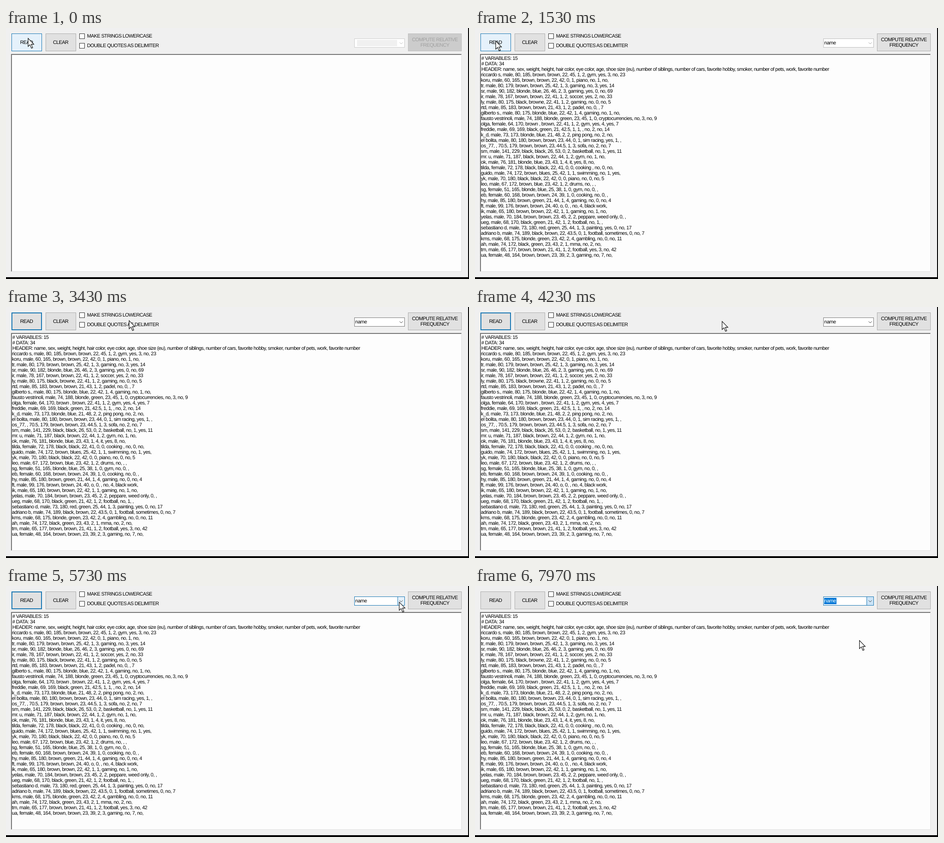
Animation, 1017 px wide and 551 px high, one loop 8000 ms. Source, as an HTML page:

```html
<!DOCTYPE html>
<html lang="en">
<head>
<meta charset="utf-8">
<title>CSV reader</title>
<style>
  html, body { margin: 0; width: 100%; height: 100%; overflow: hidden; }
  body {
    position: relative;
    background: #f0f0f0;
    color: #000;
    font: 11px/12px "Liberation Sans", Arial, sans-serif;
    letter-spacing: -.62px;
    text-rendering: geometricPrecision;
    cursor: default;
    --blue: #1a78b4;
  }
  body * { position: absolute; box-sizing: border-box; white-space: pre; }
  .edge { background: #000; }

  .btn {
    top: 12px; height: 39px;
    display: flex; align-items: center; justify-content: center;
    text-align: center;
    background: #e1e1e1;
    border: 1px solid #adadad;
  }
  .btn span { position: static; }
  #read { left: 12px; width: 67px; animation: read 8s step-end infinite; }
  #clear { left: 87px; width: 67px; }
  #read span, #clear span { margin-right: 1px; }
  #compute { left: 883px; width: 118px; animation: enable 8s step-end infinite; }

  .check { left: 161px; width: 12px; height: 12px; background: #fff; border: 1px solid #333; }
  .label { left: 178px; }

  #combo {
    left: 765px; top: 23px; width: 111px; height: 20px;
    background: #fff;
    border: 1px solid #7a7a7a;
    animation: combo 8s step-end infinite;
  }
  #blank { left: 5px; top: 2px; width: 88px; height: 14px; background: #f0f0f0; animation: before 8s step-end infinite; }
  #value { left: 1px; top: 2px; height: 14px; line-height: 14px; letter-spacing: -.49px; padding-right: 1px; animation: value 8s step-end infinite; }
  #drop { right: -1px; top: -1px; width: 16px; height: 20px; border: 1px solid transparent; animation: drop 8s step-end infinite; }
  #arrow { left: 3px; top: 7px; width: 8px; height: 5px; fill: none; stroke: #444; animation: arrow 8s step-end infinite; }

  #box {
    left: 11px; top: 57px; width: 990px; height: 478px;
    background: #fdfdfd;
    border: 1px solid #e3e3e3;
    border-top-color: #808080;
    border-left-color: #808080;
    box-shadow: inset 1px 1px #696969;
  }
  #data {
    left: 1px; top: 2.5px; margin: 0;
    font: inherit; line-height: 12.02px; letter-spacing: -.49px;
    animation: data 8s step-end infinite;
  }
  #data b { position: relative; left: 1px; font-weight: normal; letter-spacing: -.545px; }

  #mouse { left: -1px; top: 0; width: 16px; height: 26px; overflow: visible; animation: mouse 8s linear infinite; }
  #mouse path { fill: #fff; stroke: #000; stroke-width: 1.1; stroke-linejoin: miter; }

  @keyframes read {
    0%, 17.9% { background: #e5f1fb; border: 1px solid var(--blue); }
    16.25% { background: #cce4f7; border: 1px solid #005499; }
    35.9% { background: #e1e1e1; border: 2px solid var(--blue); }
    72.5%, 100% { background: #e1e1e1; border: 1px solid #adadad; }
  }
  @keyframes enable {
    0% { background: #ccc; border-color: #bfbfbf; color: #a0a0a0; }
    18.5%, 100% { background: #e1e1e1; border-color: #adadad; color: #000; }
  }
  @keyframes combo {
    0% { border-color: #ccc; }
    18.5% { border-color: #bdbdbd; }
    20.2% { border-color: #9a9a9a; }
    21.5% { border-color: #7a7a7a; }
    63% { border-color: #171717; }
    67.5%, 100% { border-color: var(--blue); }
  }
  @keyframes arrow {
    0% { stroke: #bfbfbf; }
    18.5% { stroke: #a8a8a8; }
    20.2% { stroke: #777; }
    21.5%, 100% { stroke: #444; }
  }
  @keyframes before { 0% { opacity: 1; } 18.5%, 100% { opacity: 0; } }
  @keyframes data { 0% { opacity: 0; } 18.5%, 100% { opacity: 1; } }
  @keyframes value {
    0% { opacity: 0; background: transparent; color: #000; }
    18.5% { opacity: 1; background: transparent; color: #000; }
    72.5%, 100% { opacity: 1; background: #0078d7; color: #fff; }
  }
  @keyframes drop {
    0% { background: transparent; border-color: transparent; }
    67.5% { background: #e5f1fb; border-color: var(--blue); }
    72.5%, 100% { background: #cce4f7; border-color: var(--blue); }
  }
  @keyframes mouse {
    0% { transform: translate(49px, 22px); }
    8% { transform: translate(48px, 25px); }
    15%, 19.125% { transform: translate(46px, 28px); }
    33.375% { transform: translate(52px, 28px); }
    35% { transform: translate(56px, 28px); }
    52.875% { transform: translate(543px, 31px); }
    60.875% { transform: translate(717px, 31px); }
    67.5% { transform: translate(862px, 34px); }
    73% { transform: translate(865px, 35px); }
    84.125% { transform: translate(857px, 42px); }
    87% { transform: translate(857px, 45px); }
    99.6%, 100% { transform: translate(845px, 119px); }
  }
</style>
</head>
<body>
<div class="btn" id="read"><span>READ</span></div>
<div class="btn" id="clear"><span>CLEAR</span></div>
<div class="check" style="top:12px"></div>
<div class="label" style="top:12px">MAKE STRINGS LOWERCASE</div>
<div class="check" style="top:33px"></div>
<div class="label" style="top:33px">DOUBLE QUOTES AS DELIMITER</div>

<div id="combo">
  <div id="blank"></div>
  <div id="value">name</div>
  <div id="drop"><svg id="arrow" viewBox="0 0 8 5"><path d="M.5 .5L4 4L7.5 .5"/></svg></div>
</div>
<div class="btn" id="compute"><span>COMPUTE RELATIVE
FREQUENCY</span></div>

<div id="box"><pre id="data"><b># VARIABLES: 15
# DATA: 34
HEADER: name, sex, weight, height, hair color, eye color, age, shoe size (eu), number of siblings, number of cars, favorite hobby, smoker, number of pets, work, favorite number</b>
riccardo s, male, 80, 185, brown, brown, 22, 45, 1, 2, gym, yes, 3, no, 23
koru, male, 60, 165, brown, brown, 22, 42, 0, 1, piano, no, 1, no,
tr, male, 80, 179, brown, brown, 25, 42, 1, 3, gaming, no, 3, yes, 14
sr, male, 90, 182, blonde, blue, 26, 46, 2, 3, gaming, yes, 0, no, 69
ir, male, 78, 167, brown, brown, 22, 41, 1, 2, soccer, yes, 2, no, 33
ly, male, 80, 175, black, browne, 22, 41, 1, 2, gaming, no, 0, no, 5
rtd, male, 85, 183, brown, brown, 21, 43, 1, 2, padel, no, 0, , 7
gilberto s., male, 80, 175, blonde, blue, 22, 42, 1, 4, gaming, no, 1, no,
fausto vestrinoli, male, 74, 188, blonde, green, 23, 45, 1, 0, cryptocurrencies, no, 3, no, 9
olga, female, 64, 170, brown , brown, 22, 41, 1, 2, gym, yes, 4, yes, 7
freddie, male, 69, 169, black, green, 21, 42.5, 1, 1, , no, 2, no, 14
k_d, male, 73, 173, blonde, blue, 21, 48, 2, 2, ping pong, no, 2, no,
el bolita, male, 80, 180, brown, brown, 23, 44, 0, 1, sim racing, yes, 1, ,
os_77, , 70.5, 179, brown, brown, 23, 44.5, 1, 3, sofa, no, 2, no, 7
sm, male, 141, 229, black, black, 26, 53, 0, 2, basketball, no, 1, yes, 11
mr. u, male, 71, 187, black, brown, 22, 44, 1, 2, gym, no, 1, no,
ok, male, 76, 181, blonde, blue, 23, 43, 1, 4, it, yes, 8, no,
tilda, female, 72, 178, black, black, 22, 41, 0, 0, cooking , no, 0, no,
guido, male, 74, 172, brown, blues, 25, 42, 1, 1, swimming, no, 1, yes,
yk, male, 70, 180, black, black, 22, 42, 0, 0, piano, no, 0, no, 5
leo, male, 67, 172, brown, blue, 23, 42, 1, 2, drums, no, , ,
sg, female, 51, 165, blonde, blue, 25, 38, 1, 0, gym, no, 0, ,
eb, female, 60, 168, brown, brown, 24, 39, 1, 0, cooking, no, 0, ,
hy, male, 85, 180, brown, green, 21, 44, 1, 4, gaming, no, 0, no, 4
ft, male, 99, 176, brown, brown, 24, 40, o, 0, , no, 4, black work,
ik, male, 65, 180, brown, brown, 22, 42, 1, 1, gaming, no, 1, no,
yelas, male, 70, 184, brown, brown, 23, 45, 2, 2, peppare, weed only, 0, ,
ueg, male, 68, 170, black, green, 21, 42, 1, 2, football, no, 1, ,
sebastiano d, male, 73, 180, red, green, 25, 44, 1, 3, painting, yes, 0, no, 17
adriano b, male, 74, 189, black, brown, 22, 43.5, 0, 1, football, sometimes, 0, no, 7
kms, male, 68, 175, blonde, green, 23, 42, 2, 4, gambling, no, 0, no, 11
ah, male, 74, 172, black, green, 23, 43, 2, 1, mma, no, 2, no,
tm, male, 65, 177, brown, brown, 21, 41, 1, 2, football, yes, 3, no, 42
ua, female, 48, 164, brown, brown, 23, 39, 2, 3, gaming, no, 7, no,</pre></div>

<div class="edge" style="left:1015px;top:0;width:2px;height:551px"></div>
<div class="edge" style="left:0;top:547px;width:1017px;height:4px"></div>

<svg id="mouse" viewBox="0 0 16 26"><path d="M.5 .5V18.5L4.6 14.6L7.9 22.3L10.7 21.1L7.5 13.6H13.2Z"/></svg>
</body>
</html>
```
